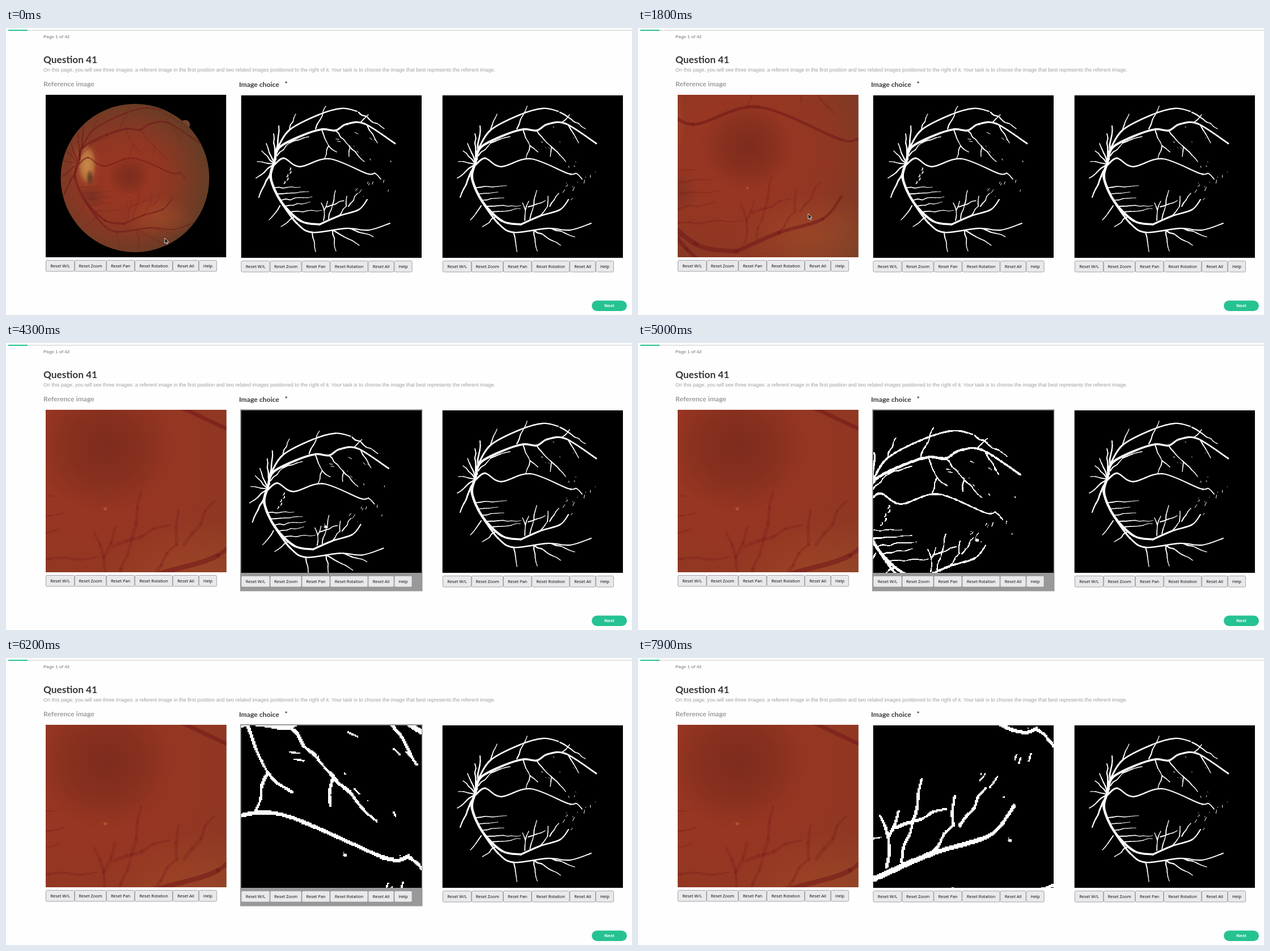
Animation of 1104 by 507 pixels, one loop 8 s. Source, as an HTML page with a canvas:

```html
<!DOCTYPE html>
<html lang="en">
<head>
<meta charset="utf-8">
<title>Image choice</title>
<style>
html, body { margin: 0; width: 100%; height: 100%; overflow: hidden; background: #fefefe; }
canvas, svg { position: absolute; left: 0; top: 0; width: 1104px; height: 507px; }
text { font-family: "Liberation Sans", Arial, sans-serif; }
.head { font-family: Lato, sans-serif; font-weight: 700; }
.btn { font-family: "Noto Sans", sans-serif; font-size: 7.4px; text-anchor: middle; fill: #111; }
</style>
</head>
<body>
<canvas id="stage" width="1104" height="507"></canvas>
<svg id="ui" viewBox="0 0 1104 507">
  <rect x="4" y="3" width="1100" height="2" fill="#e2e2e2"/>
  <rect x="4" y="3" width="34" height="2" fill="#26c292"/>
  <text x="66" y="17.5" font-size="7.9" font-weight="700" fill="#999">Page 1 of 42</text>
  <text class="head" x="66" y="62" font-size="17.2" fill="#373737">Question 41</text>
  <text x="66" y="76.5" font-size="8.99" fill="#a0a0a0">On this page, you will see three images: a referent image in the first position and two related images positioned to the right of it. Your task is to choose the image that best represents the referent image.</text>
  <text class="head" x="66" y="102.5" font-size="12.2" fill="#9b9b9b">Reference image</text>
  <text class="head" x="411" y="104" font-size="12.2" fill="#373737">Image choice</text>
  <text class="head" x="491.5" y="103" font-size="12.2" fill="#373737">*</text>
  <rect x="1033" y="481.5" width="62" height="18.5" rx="9.25" fill="#26c292"/>
  <text x="1064" y="492.5" font-size="8" font-weight="700" fill="#fff" text-anchor="middle">Next</text>
</svg>
<script>
const LOOP = 8000, STEP = 100, W = 318.5, H = 287, MASK_X = 414.5, MASK_Y = 119;
const ctx = document.getElementById('stage').getContext('2d');

// Toolbars
const buttons = { 'Reset W/L': 51, 'Reset Zoom': 56, 'Reset Pan': 50, 'Reset Rotation': 67, 'Reset All': 46, 'Help': 32 };
function toolbar(x, y) {
  return Object.entries(buttons).map(([label, w]) => {
    const left = x;
    x += w;
    return `<rect x="${left + .4}" y="${y + .5}" width="${w - .8}" height="19.5" rx="2" fill="#e9e9eb" stroke="#8f8f9a" stroke-width=".8"/>
      <text class="btn" x="${left + w / 2}" y="${y + 13}">${label}</text>`;
  }).join('');
}
document.getElementById('ui').innerHTML += toolbar(70, 410) + toolbar(414.5, 411) + toolbar(770, 411);

function seeded(seed) {
  return () => (seed = (seed * 16807) % 2147483647) / 2147483647;
}

// Trunks: start width, end width, key points
const trunks = [
  [4.2, 2.6, 473, 238, 482, 211, 522, 190, 557, 179, 581, 181, 600, 170, 632, 169, 686, 204],
  [3, 1.8, 479, 212, 500, 180, 552, 153, 592, 142, 619, 147],
  [4.6, 3.2, 472, 240, 467, 266, 486, 308, 520, 341, 553, 347],
  [3.2, 1.5, 553, 347, 587, 332, 622, 321, 637, 303],
  [3.2, 1.5, 488, 312, 513, 345, 540, 361, 600, 354, 640, 357, 677, 345],
  [2.8, 1.5, 473, 242, 490, 230, 518, 245, 570, 231, 636, 257, 651, 257, 661, 267]
];
// Twigs: from, to
const upperTwigs = [
  [500, 178, 511, 152], [546, 178, 564, 138], [625, 167, 639, 153], [622, 149, 667, 178],
  [557, 180, 569, 208], [569, 208, 583, 219], [569, 208, 562, 230], [581, 181, 605, 208],
  [605, 208, 632, 236], [607, 210, 605, 227], [637, 172, 655, 203], [478, 226, 500, 203], [500, 203, 534, 192]
];
const lowerTwigs = [
  [560, 340, 561, 322], [561, 322, 556, 309], [561, 322, 567, 306], [569, 337, 576, 312], [576, 312, 581, 287],
  [566, 316, 596, 305], [587, 332, 600, 315], [600, 315, 601, 297], [604, 315, 620, 292],
  [540, 361, 546, 395], [576, 357, 582, 394], [576, 357, 623, 384], [607, 354, 648, 369],
  [483, 314, 464, 339], [508, 334, 485, 351]
];
const spokeTips = [[481, 173], [472, 187], [459, 204], [451, 217], [443, 236], [441, 265], [446, 299]];

// Smooth tapering stroke through the points
function vessel(g, w0, w1, p) {
  const last = p.length - 1, pt = i => p[Math.max(0, Math.min(last, i))];
  for (let i = 0; i < last; i++) {
    const [a, b, c, d] = [-1, 0, 1, 2].map(k => pt(i + k));
    g.lineWidth = w0 + (w1 - w0) * i / last;
    g.beginPath();
    g.moveTo(...b);
    g.bezierCurveTo(b[0] + (c[0] - a[0]) / 6, b[1] + (c[1] - a[1]) / 6,
      c[0] - (d[0] - b[0]) / 6, c[1] - (d[1] - b[1]) / 6, ...c);
    g.stroke();
  }
}

// Slightly winding line; longer ones are stouter
function twig(g, rnd, x0, y0, x1, y1, w = 1.5) {
  const dx = x1 - x0, dy = y1 - y0, len = Math.hypot(dx, dy), n = Math.max(2, Math.round(len / 8));
  const p = Array.from({ length: n + 1 }, (_, i) => {
    const u = i / n, off = i % n ? (rnd() - .5) * 2.6 / len : 0;
    return [x0 + dx * u - dy * off, y0 + dy * u + dx * off];
  });
  vessel(g, w + len / 60, w * .75, p);
}

function drawTrunks(g, rnd) {
  g.lineCap = g.lineJoin = 'round';
  for (const [w0, w1, ...p] of trunks) {
    vessel(g, w0, w1, p.flatMap((x, i) => i % 2 ? [] : [[x, p[i + 1]]]));
  }
  for (const [x, y] of spokeTips) {
    twig(g, rnd, 472 + (x - 460) / 6, 239 + (y - 230) / 8, x, y, 1.4 + Math.abs(y - 234) / 60);
  }
}

function drawTwigs(g, rnd) {
  [...upperTwigs, ...lowerTwigs].forEach(t => twig(g, rnd, ...t));
  for (let i = 0; i < 5; i++) {
    const x = 474 + i * 6, y = 282 + i * 11;
    twig(g, rnd, x, y, x + 32 + rnd() * 30, y - 8 + rnd() * 8, 1);
  }
}

function drawMask(g, seed, patches) {
  const rnd = seeded(seed);
  g.strokeStyle = '#fff';
  drawTrunks(g, rnd);
  drawTwigs(g, rnd);
  for (let i = 0; i < 24; i++) {
    const a = -1.6 + rnd() * 2.4, r = 60 + rnd() * 62, len = rnd() * rnd() * 9;
    const x = 570 + r * Math.cos(a), y = 255 + r * Math.sin(a) * .75;
    g.lineWidth = 1;
    g.beginPath();
    g.moveTo(x, y);
    g.lineTo(x - len * Math.sin(a), y + len * Math.cos(a));
    g.stroke();
  }
  for (let i = 0; i < patches; i++) {
    const x = 502 - i * 2.5 + (i % 2) * 3, y = 247 + i * 6;
    twig(g, rnd, x, y, x - 2, y + 4, 1.6);
  }
}
const maskA = g => drawMask(g, 41, 5), maskB = g => drawMask(g, 73, 0);

// Hard-edged bitmap for magnified views
const RES = 1.5, sprite = document.createElement('canvas');
sprite.width = Math.ceil(W * RES);
sprite.height = Math.ceil(H * RES);
{
  const g = sprite.getContext('2d');
  g.scale(RES, RES);
  g.translate(-MASK_X, -MASK_Y);
  maskA(g);
  const img = g.getImageData(0, 0, sprite.width, sprite.height);
  for (let i = 3; i < img.data.length; i += 4) img.data[i] = img.data[i] > 115 ? 255 : 0;
  g.putImageData(img, 0, 0);
}

// Motion, in steps of 100 ms
const ramp = (t, a, b) => Math.max(0, Math.min(1, (t - a) / (b - a)));

function fundusView(t) {
  const pan = ramp(t, 900, 1000);
  return [1 + 1.2 * ramp(t, 1000, 1800) + 1.1 * ramp(t, 1900, 2500), -4 * pan, -24 * pan];
}

function maskView(t) {
  const first = ramp(t, 4200, 4400), second = ramp(t, 6500, 7100), third = ramp(t, 7300, 7900);
  const zoom = 1 + 1.55 * ramp(t, 4900, 5500) + .75 * ramp(t, 5600, 6500) - .38 * third;
  return [zoom, -32 * first ** 1.5 + 5.5 * second - 6 * third, 35 * first - 62 * second - 14 * third];
}

// Pointer moves: from, to, dx, dy
const moves = [
  [0, 800, 2, -4], [900, 1000, 0, -17], [1000, 1800, 18, -22], [3500, 4100, 274, -27],
  [4200, 4400, -29, 35], [4500, 4800, 48, 6], [6500, 7100, -1, -61], [7300, 7900, 59, 35]
];
const pointer = t => moves.reduce(([x, y], [a, b, dx, dy]) => {
  const u = ramp(t, a, b);
  return [x + dx * u, y + dy * u];
}, [280, 371]);

// Black viewport whose content is scaled about its centre
function viewport(x, y, [s, px, py], draw) {
  const cx = x + W / 2, cy = y + H / 2;
  ctx.save();
  ctx.beginPath();
  ctx.rect(x, y, W, H);
  ctx.clip();
  ctx.fillStyle = '#000';
  ctx.fillRect(x, y, W, H);
  ctx.translate(cx, cy);
  ctx.scale(s, s);
  ctx.translate(px - cx, py - cy);
  draw(s);
  ctx.restore();
}

// Soft ellipse: [rgb, alpha from the centre outwards]
function glow(x, y, rx, ry, rgb, ...alphas) {
  const g = ctx.createRadialGradient(0, 0, 0, 0, 0, 1);
  [...alphas, 0].forEach((a, i) => g.addColorStop(i / alphas.length, `rgba(${rgb},${a})`));
  ctx.save();
  ctx.translate(x, y);
  ctx.scale(rx, ry);
  ctx.fillStyle = g;
  ctx.beginPath();
  ctx.arc(0, 0, 1, 0, 7);
  ctx.fill();
  ctx.restore();
}

function fundus() {
  const rnd = seeded(41);
  ctx.fillStyle = '#6f4630';
  ctx.beginPath();
  ctx.arc(316, 171, 8.5, 0, 7);
  ctx.fill();
  ctx.beginPath();
  ctx.arc(227.5, 265, 131, 0, 7);
  ctx.fillStyle = '#643d26';
  ctx.fill();
  ctx.clip();
  glow(208, 268, 150, 146, '152,54,34', 1, .98, .85, .45);
  glow(272, 335, 60, 36, '176,88,44', .4, .25);
  glow(140, 242, 28, 46, '190,105,55', .6, .3);
  glow(143, 241, 16, 35, '198,136,72', 1, .85, .6);
  glow(148, 264, 7, 15, '76,50,30', .85, .5);
  glow(152, 298, 26, 20, '95,42,35', .5);
  glow(217, 262, 38, 36, '88,30,22', .42, .26);
  ctx.translate(-345, -1);
  ctx.strokeStyle = 'rgba(112,24,24,.55)';
  drawTrunks(ctx, rnd);
  ctx.strokeStyle = 'rgba(112,24,24,.25)';
  drawTwigs(ctx, rnd);
  glow(561.8, 296, 1.4, 1.2, '200,110,65', .8);
}

function shape(x, y, pts, fill, line) {
  ctx.beginPath();
  for (let i = 0; i < pts.length; i += 2) ctx.lineTo(x + pts[i], y + pts[i + 1]);
  ctx.closePath();
  ctx.lineWidth = .9;
  ctx.lineJoin = 'round';
  ctx.fillStyle = fill;
  ctx.strokeStyle = line;
  ctx.fill();
  ctx.stroke();
}
const arrow = [0, 0, 0, 9.5, 2.2, 7.6, 3.9, 11, 5.4, 10.3, 3.9, 7, 7, 7];
const hand = [1.5, 0, 3, 0, 3.4, 3.2, 8, 4, 8.6, 5.2, 8, 9.2, 3, 9.2, 0, 5.4, 2, 5.4];

function render(time) {
  const t = Math.floor(time / STEP) * STEP;
  const [mx, my] = pointer(t);
  const inside = mx > 413;
  ctx.fillStyle = '#fefefe';
  ctx.fillRect(0, 0, 1104, 507);
  if (inside && t < 7900) {
    ctx.fillStyle = '#999';
    ctx.fillRect(413, 117, 321.5, 321.5);
  }
  viewport(70, 118, fundusView(t), fundus);
  viewport(MASK_X, MASK_Y, maskView(t), s => {
    if (s === 1) return maskA(ctx);
    ctx.imageSmoothingEnabled = false;
    ctx.drawImage(sprite, MASK_X, MASK_Y, sprite.width / RES, sprite.height / RES);
  });
  viewport(769.5, MASK_Y, [1, 0, 0], () => {
    ctx.translate(355, 0);
    maskB(ctx);
  });
  if (inside) shape(mx, my, hand, '#fff', '#222');
  else shape(mx, my, arrow, '#111', '#eee');
}

const start = performance.now();
function tick() {
  render((performance.now() - start) % LOOP);
  requestAnimationFrame(tick);
}
tick();
</script>
</body>
</html>
```
